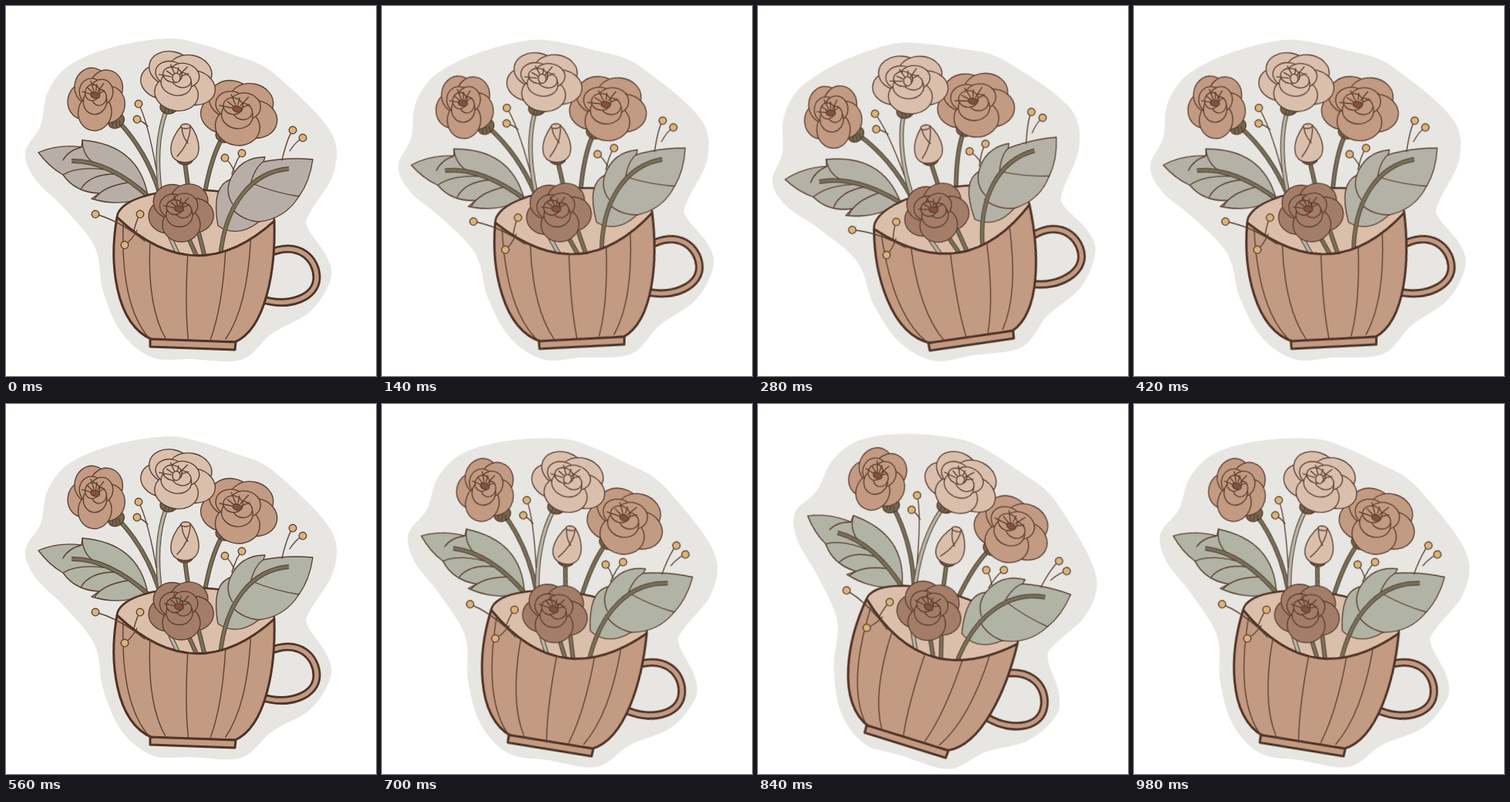
Write an HTML page that moves like this. It is 480 px wide and 480 px high and loops after 1120 ms.

```html
<!DOCTYPE html>
<html lang="en">
<head>
<meta charset="utf-8">
<title>Flowers in a cup</title>
<style>
html, body { margin: 0; width: 100%; height: 100%; overflow: hidden; background: #fff; }
svg { display: block; width: 100vw; height: 100vh; }
#art { transform-origin: 221px 250px; animation: rock 1120ms step-end infinite; }
path, ellipse { fill: none; stroke: #5a3f30; stroke-width: 1.35; stroke-linecap: round; stroke-linejoin: round; }
.sticker { fill: #e7e6e2; stroke: none; }
.cup { fill: #c39a82; stroke: #4f3327; stroke-width: 3; }
.inside { fill: #dcbfab; stroke: #4f3327; stroke-width: 2.6; }
.handleEdge { stroke: #4f3327; stroke-width: 11; }
.handle { stroke: #c39a82; stroke-width: 5.5; }
.leaf { fill: #b1b3a4; animation: tint 1120ms step-end infinite; }
.stemEdge { stroke: #594634; stroke-width: 5.8; stroke-linecap: butt; }
.stem { stroke: #77705a; stroke-width: 3.6; stroke-linecap: butt; }
.light { stroke: #b8b5aa; }
.calyx { fill: #73674f; }
.pale { fill: #dabfad; }
.rose { fill: #c39a82; }
.brown { fill: #a47d69; }
.heart { fill: #875039; }
.berry { fill: #dcb47a; }
@keyframes rock {
  0%, 50% { transform: none; }
  12.5%, 37.5% { transform: translate(.5px, .5px) rotate(-5deg); }
  25% { transform: translate(1px, 2px) rotate(-10.3deg); }
  62.5%, 87.5% { transform: translate(0, 3px) rotate(7.2deg); }
  75% { transform: translate(.5px, 0) rotate(15.2deg); }
}
@keyframes tint { 0% { fill: #b7afa7; } 12.5% { fill: #b4b1a6; } 50%, 100% { fill: #b1b3a4; } }
</style>
</head>
<body>
<svg viewBox="0 0 480 480"><g id="art"></g></svg>
<script>
const art = document.getElementById('art');
const mix = (a, b, t) => a + (b - a) * t;

function add(tag, cls, attrs) {
  const el = document.createElementNS('http://www.w3.org/2000/svg', tag);
  el.setAttribute('class', cls);
  for (const key in attrs) el.setAttribute(key, attrs[key]);
  art.append(el);
}

const path = (cls, d) => add('path', cls, { d });

function oval(cls, cx, cy, rx, ry = rx, turn = 0, ox = cx, oy = cy) {
  add('ellipse', cls, { cx, cy, rx, ry, transform: `rotate(${turn} ${ox} ${oy})` });
}

// Smooth closed curve through the points
function loop(cls, text) {
  const pts = text.split(' ').map(p => p.split(',').map(Number));
  const at = i => pts[(i + pts.length) % pts.length];
  const handle = (p, from, to) => p.map((v, k) => v + (to[k] - from[k]) / 6);
  let d = 'M' + pts[0];
  pts.forEach((p, i) => {
    const next = at(i + 1);
    d += `C${handle(p, at(i - 1), next)} ${handle(next, at(i + 2), p)} ${next}`;
  });
  path(cls, d);
}

function stem(d, shade = '') {
  path('stemEdge', d);
  path('stem ' + shade, d);
}

function calyx(x, y, turn) {
  oval('calyx', x, y, 11, 9, turn);
  for (const dx of [-4, 0, 4]) path('', `M${x + dx} ${y}l${dx / 4} 7`);
}

// Rings of overlapping petals, closing in on the heart
function bloom(cls, cx, cy, rx, ry, turn, hasHeart = true) {
  const hx = cx - rx * .06, hy = cy - ry * .1;
  const ring = (n, dist, size, x, y, phase) => {
    for (let i = 0; i < n; i++) {
      const a = phase + i * 2 * Math.PI / n;
      oval(cls, x + rx * dist * Math.cos(a), y + ry * dist * Math.sin(a), rx * size, ry * size, turn, cx, cy);
    }
  };
  ring(5, .43, .57, cx, cy, 2.8);
  ring(3, .2, .4, hx, hy, 3.6);
  ring(2, .14, .25, hx, hy, .4);
  for (let i = 0; i < 6; i++) {
    const a = -2.9 + i * .5, reach = i % 2 ? .34 : .46;
    const spot = r => `${hx + rx * r * Math.cos(a)} ${hy + ry * r * Math.sin(a)}`;
    path('', `M${spot(.14)}L${spot(reach)}`);
  }
  if (hasHeart) oval('heart', hx, hy, 6, 4, 15);
  else oval(cls, hx, hy, 5, 6);
}

function berry(x, y, jointX, jointY) {
  path('', `M${x} ${y}Q${mix(x, jointX, .5)} ${mix(y, jointY, .25)} ${jointX} ${jointY}`);
  oval('berry', x, y, 4.8);
}

loop('sticker', '210,42 255,50 294,63 332,77 362,100 407,144 428,180 423,222 395,267 391,287 416,325 ' +
  '421,355 395,396 345,425 305,459 240,458 190,456 150,424 126,370 115,312 75,262 38,225 25,190 ' +
  '45,155 54,112 82,77 140,53');

// Plants behind the cup
stem('M146 150Q182 188 199 242');
stem('M207 138Q192 180 200 240', 'light');
stem('M279 174Q266 198 258 242');
stem('M232 203L237 240');
path('leaf', 'M42 190Q68 179 98 183L99 174Q172 180 184 246Q150 262 111 250L121 243Q90 242 74 219Q56 209 42 190Z');
path('', 'M98 183Q80 188 74 200M74 219Q92 208 127 212M99 174Q99 195 117 206M97 238Q108 218 142 218M115 250Q126 234 158 229');
stem('M85 201Q133 200 187 249');

// Cup opening and handle
const grip = 'M340 321C382 303 403 330 403 352C403 378 368 392 330 380';
path('handleEdge', grip);
path('handle', grip);
path('inside', 'M144 274A102 38 1 0 1 348 279Q246 371 144 274Z');
stem('M213 300L224 324', 'light');
stem('M235 297L248 326');
stem('M250 294L258 326');
path('leaf', 'M398 199Q365 196 334 202L336 196Q304 196 291 225Q266 234 275 285Q300 302 328 280Q362 276 380 247Q394 228 398 199Z');
path('', 'M334 202Q324 208 318 228M291 225Q284 242 294 257M380 247Q348 242 319 230M328 280Q306 278 292 262');
stem('M367 211C320 215 284 256 278 326');

// Blooms and bud
calyx(143, 149, -35);
bloom('rose', 118, 120, 38, 42, 10);
calyx(211, 131, 0);
calyx(283, 168, 15);
bloom('rose', 303, 138, 51, 43, 10);
bloom('pale', 224, 97, 50, 39, 12, false);
calyx(232, 197, 0);
path('pale', 'M228 155C212 172 205 202 232 203C258 202 252 170 239 155Z');
oval('pale', 233, 156, 6, 3);
path('', 'M239 158Q238 178 222 195M228 158Q229 170 236 178');

// Cup body with ribs running from rim to base
path('cup', 'M144 274C134 330 140 412 190 433L297 436C338 418 350 340 348 279Q246 371 144 274Z');
path('cup', 'M187 432L298 436L297 446L187 442Z');
for (const t of [.04, .21, .45, .69, .85]) {
  const x = mix(144, 348, t), y = mix(274, 279, t) + 188 * t * (1 - t);
  path('', `M${x} ${y}Q${mix(140, 344, t)} 390 ${mix(182, 303, t)} 432`);
}

const sprigs = [
  [172, 127, 195, 212], [170, 147, 184, 156], [372, 161, 358, 200], [385, 171, 368, 188],
  [284, 197, 296, 214], [306, 191, 293, 218], [116, 270, 180, 305], [174, 270, 166, 291], [154, 310, 170, 291]
];
sprigs.forEach(s => berry(...s));

bloom('brown', 227, 267, 43, 39, 0);
</script>
</body>
</html>
```
